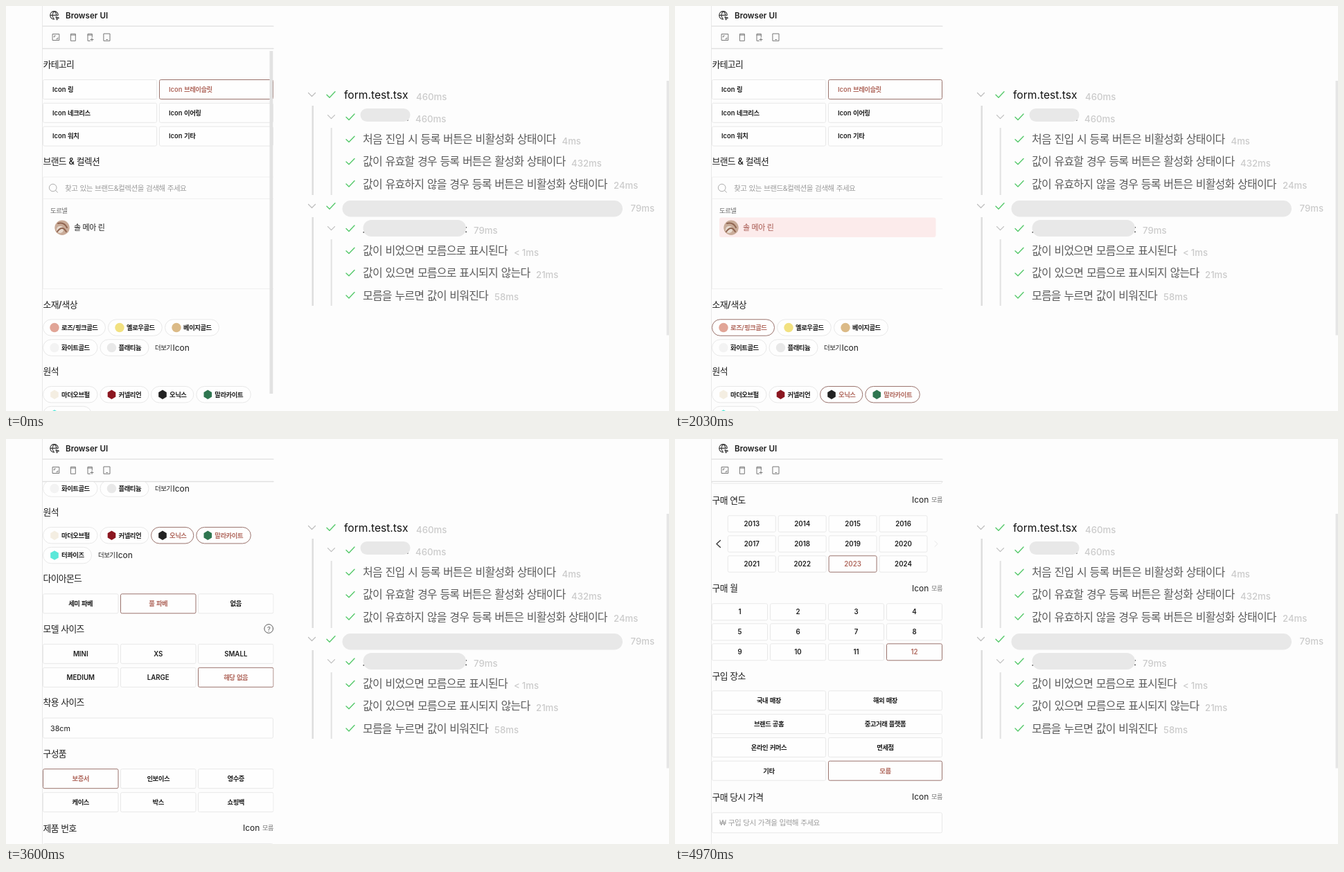
An HTML page for the animation above (5010 ms loop, 957 by 585 pixels).

```html
<!DOCTYPE html>
<html lang="ko">
<head>
<meta charset="utf-8">
<title>Form test run</title>
<style>
  html, body { margin: 0; width: 100%; height: 100%; overflow: hidden; background: #fdfdfd; }
  svg { display: block; }
  text {
    font-family: Inter, 'Noto Sans CJK KR', 'Noto Sans CJK', sans-serif;
    letter-spacing: -.05em; word-spacing: .06em; white-space: pre;
  }
  tspan { letter-spacing: 0; }
  .box rect { fill: #fefefe; stroke: #e8e8e8; }
  .box.on > rect { stroke: #9a736d; }
  .box.on > text { fill: #b0685d; }
  .line { fill: none; stroke-linecap: round; stroke-linejoin: round; }
</style>
</head>
<body>
<svg id="stage" width="957" height="585"></svg>
<script>
const LOOP = 5010;
const DARK = '#1d1d1d', GRAY = '#9c9c9c';

// ---- drawing helpers; y is always the vertical centre of the text or box ----
const text = (x, y, size, str, { weight = 400, fill = DARK, anchor = 'start', extra = '' } = {}) =>
  `<text x="${x}" y="${y + size * .36}" font-size="${size}" font-weight="${weight}" fill="${fill}"
    text-anchor="${anchor}" ${extra}>${str.replace(/[A-Za-z\d.\/]+/g, '<tspan>$&</tspan>')}</text>`;
const rect = (x, y, w, h, fill, extra = '') =>
  `<rect x="${x}" y="${y}" width="${w}" height="${h}" fill="${fill}" ${extra}/>`;
const path = (d, stroke, width = 1) =>
  `<path class="line" d="${d}" stroke="${stroke}" stroke-width="${width}"/>`;
const circle = (x, y, r, fill, extra = '') => `<circle cx="${x}" cy="${y}" r="${r}" fill="${fill}" ${extra}/>`;

const group = (at, body) => `<g class="box" ${at === undefined ? '' : `data-at="${at}"`}>${body}</g>`;
const outline = (x, y, w, h, r) => rect(x, y - h / 2, w, h, 'none', `rx="${r}"`);
const title = (y, str) => text(53.5, y, 12.8, str, { weight: 500 });
const input = (y, body) => group(undefined, outline(53.5, y, 332, 29, 2)) + body;
const hint = (x, y, str) => text(x, y, 10.6, str, { fill: GRAY });
const iconLabel = (x, y, str) => text(x, y, 12, 'Icon') + str;
const unknown = y => iconLabel(342, y, text(370, y, 9.2, '모름', { fill: '#777' }));
const more = (x, y) => text(x, y, 9.4, '더보기', { weight: 500 }) + iconLabel(x + 25.5, y, '');

// Labels fill a grid row by row; "selected" maps a label to its selection time.
function grid(labels, { x = 53.5, y, cols, w, h = 28, stepX, stepY, left, selected = {} }) {
  return labels.map((label, i) => {
    const bx = x + (i % cols) * stepX, by = y + Math.floor(i / cols) * stepY;
    const size = /^[A-Z\d]+$/.test(label) ? 9.7 : 9.4;
    const caption = left
      ? text(bx + 13.5, by, size, label, { weight: 600 })
      : text(bx + w / 2, by, size, label, { weight: 600, anchor: 'middle' });
    return group(selected[label], outline(bx, by, w, h, 2) + caption);
  }).join('');
}

function hexagon(x, y, r, fill) {
  const points = Array.from({ length: 6 }, (_, i) => {
    const a = i * Math.PI / 3;
    return [x + r * Math.sin(a), y + r * Math.cos(a)].map(v => v.toFixed(1));
  });
  return `<polygon points="${points.join(' ')}" fill="${fill}"/>`;
}
const pill = (mark, x, y, w, label, fill, at) => group(at,
  outline(x, y, w, 23.5, 11.75) + mark(x + 16.5, y, 6.7, fill) + text(x + 26.5, y, 9.4, label, { weight: 600 }));

// ---- scrolling form ----
const two = { cols: 2, w: 164, stepX: 168, stepY: 33.8 };
const three = { cols: 3, w: 108.5, stepX: 112, stepY: 34 };
const form = [
  title(84.5, '카테고리'),
  grid(['Icon 링', 'Icon 브레이슬릿', 'Icon 네크리스', 'Icon 이어링', 'Icon 워치', 'Icon 기타'],
    { ...two, y: 120.5, left: true, selected: { 'Icon 브레이슬릿': 0 } }),

  title(224.5, '브랜드 & 컬렉션'),
  path('M53.5 408.5V247H386M53.5 278.5H386M53.5 408.5H386', '#f0f0f0'),
  circle(67.7, 262.5, 5.3, 'none', 'stroke="#aaa"') + path('M71.6 266.4L74.5 269.2', '#aaa'),
  hint(85, 263, '찾고 있는 브랜드&컬렉션을 검색해 주세요'),
  text(64, 295.5, 9.4, '도르넬', { fill: '#666' }),
  rect(64, 305.5, 312.5, 28.5, '#fcebeb', 'rx="3" id="hover"'),
  circle(81, 320.3, 10.7, '#c9ab98'),
  circle(78, 323, 5, '#e9dcd1') + path('M75 314Q84 312 88 320M74 326Q81 316 87 326', '#8f6450', 2),
  text(98, 319.7, 11, '솔 메아 린', { weight: 500, extra: 'id="item"' }),

  title(431, '소재/색상'),
  pill(circle, 53.5, 464.5, 90, '로즈/핑크골드', '#e1a597', 900),
  pill(circle, 147.5, 464.5, 77.8, '옐로우골드', '#f2e180'),
  pill(circle, 229.5, 464.5, 78, '베이지골드', '#dbba87'),
  pill(circle, 53.5, 493.5, 78.5, '화이트골드', '#f3f3f3'),
  pill(circle, 136, 493.5, 70, '플래티늄', '#e8e8e8'),
  more(215, 493.7),

  title(527.5, '원석'),
  pill(hexagon, 53.5, 561.2, 78.5, '마더오브펄', '#f4eee2'),
  pill(hexagon, 136, 561.2, 70, '커넬리언', '#8b1620'),
  pill(hexagon, 209.5, 561.2, 61.3, '오닉스', '#222', 1470),
  pill(hexagon, 274.8, 561.2, 78.5, '말라카이트', '#2f7650', 2030),
  pill(hexagon, 53.5, 590, 70, '터콰이즈', '#5be8d9'),
  more(133, 590),

  title(623.5, '다이아몬드'),
  grid(['세미 파베', '풀 파베', '없음'], { ...three, y: 659.8, selected: { '풀 파베': 3030 } }),

  title(696, '모델 사이즈'),
  circle(379.2, 696, 6.3, 'none', 'stroke="#555"'),
  text(379.2, 696.2, 9.5, '?', { fill: '#555', anchor: 'middle' }),
  grid(['MINI', 'XS', 'SMALL', 'MEDIUM', 'LARGE', '해당 없음'],
    { ...three, y: 732.3, selected: { '해당 없음': 3200 } }),

  title(802.5, '착용 사이즈'),
  input(839.5, text(64, 839.7, 10.8, '', { extra: 'id="size"' })),

  title(876.5, '구성품'),
  grid(['보증서', '인보이스', '영수증', '케이스', '박스', '쇼핑백'],
    { ...three, y: 912.7, selected: { 보증서: 3460, 영수증: 3700 } }),

  title(984, '제품 번호'), unknown(984),
  input(1021.2, hint(64, 1021.5, '인보이스의 Reference/Item 넘버를 입력해 주세요')),

  title(1059.5, '구매 연도'), unknown(1059.5),
  path('M65.5 1118L60 1123L65.5 1128', '#333', 1.3), path('M375 1119L379 1123L375 1127', '#e6e6e6'),
  grid(Array.from({ length: 12 }, (_, i) => `${2013 + i}`),
    { x: 76.3, y: 1094, cols: 4, w: 69, h: 23.5, stepX: 72.9, stepY: 29, selected: { 2023: 4900 } }),

  title(1187, '구매 월'), unknown(1187),
  grid(Array.from({ length: 12 }, (_, i) => `${i + 1}`),
    { y: 1221.3, cols: 4, w: 80, h: 24, stepX: 84, stepY: 29, selected: { 12: 4900 } }),

  title(1313.5, '구입 장소'),
  grid(['국내 매장', '해외 매장', '브랜드 공홈', '중고거래 플랫폼', '온라인 커머스', '면세점', '기타', '모름'],
    { ...two, y: 1349.3, selected: { 모름: 4900 } }),

  title(1488.5, '구매 당시 가격'), unknown(1488.5),
  input(1525.8, hint(64, 1526, '₩ 구입 당시 가격을 입력해 주세요')),
].join('');

// ---- browser header ----
const header = [
  path('M52.5 0V585', '#e8e8e8'),
  path('M53 29.2H386M53 61.5H386', '#e0e0e0', 1.3),
  path('M75.3 12.8A5.8 5.8 0 1 0 69.5 19.2M63.8 13.4H75M69.5 7.6Q64.5 13.4 69.5 19.2M69.5 7.6Q73 10 72.5 13.4M72 15.5L76.5 17.3L74.3 18L73.6 20Z', '#333', 1.1),
  text(86, 13.5, 11.6, 'Browser UI', { weight: 600 }),
  path('M67.5 40.5H76.8V49.5H67.5ZM69.5 45V43H71.5M74.8 45.8V47.6H72.8', '#777'),
  path('M93.8 40.3H100.3V50.3H93.8ZM93.8 42H100.3', '#777'),
  path('M121.5 50.3H118V40.3H124.3V45M118 42H124.3M124 46.5V50.5M122 48.5H126', '#777'),
  path('M141.3 40H150V50.3H141.3ZM144.8 48.5H146.5', '#777'),
].join('');

// ---- test report ----
const check = (x, y) => path(`M${x - 6} ${y + .3}L${x - 2} ${y + 4.2}L${x + 6} ${y - 4.2}`, '#56c96b', 1.4);
const chevron = (x, y) => path(`M${x - 5} ${y - 2.5}L${x} ${y + 2.5}L${x + 5} ${y - 2.5}`, '#bdbdbd', 1.2);
const duration = (x, y, str) => text(x, y, 13.2, str, { weight: 500, fill: '#cbcbcb' });
const mask = (x, y, w, h) => rect(x, y, w, h, '#e8e8e8', `rx="${h / 2}"`);
const rowY = i => 128 + i * 32.2;
const rows = [
  [0, '', 592, '460ms'],
  [1, '', 591, '460ms'],
  [2, '처음 진입 시 등록 버튼은 비활성화 상태이다', 802.5, '4ms'],
  [2, '값이 유효할 경우 등록 버튼은 활성화 상태이다', 816, '432ms'],
  [2, '값이 유효하지 않을 경우 등록 버튼은 비활성화 상태이다', 877, '24ms'],
  [0, '', 901.5, '79ms'],
  [1, '', 675, '79ms'],
  [2, '값이 비었으면 모름으로 표시된다', 733, '< 1ms'],
  [2, '값이 있으면 모름으로 표시되지 않는다', 765, '21ms'],
  [2, '모름을 누르면 값이 비워진다', 705, '58ms'],
];
const report = rows.map(([depth, label, timeX, time], i) => {
  const y = rowY(i);
  return check(depth ? 497 : 469, y)
    + (depth < 2 ? chevron(depth ? 469.5 : 441.5, y) : '')
    + text(515, y, 16, label, { weight: 300, fill: '#5c5c5c' })
    + duration(timeX, y + 2.8, time);
}).join('')
  + text(488, 128, 15.6, 'form.test.tsx', { fill: '#111' })
  + [[144, 273], [305, 433]].map(([top, end]) =>
      rect(441.5, top, 2.5, end - top, '#dedede') + rect(468.7, top + 32, 2, end - top - 32, '#e2e2e2')).join('')
  + rect(579, 164, 1.6, 1.6, '#444') + rect(515.5, 326, 1.6, 1.6, '#444')
  + rect(663.3, 319, 1.6, 1.6, '#444') + rect(663.3, 325.5, 1.6, 1.6, '#444')
  + mask(511.5, 148, 72, 19) + mask(485.5, 281, 404.5, 23.5) + mask(515.5, 309, 148.5, 24)
  + rect(953.5, 108, 3.5, 367.5, '#e6e6e6');

const stage = document.getElementById('stage');
stage.innerHTML = `${header}
  <svg x="53" y="62" width="333.5" height="523" viewBox="53 62 333.5 523">
    <g id="form">${form}</g>
    ${rect(380.5, 247, 5.5, 32, '#ececec', 'id="searchThumb"')}
    ${rect(380.5, 65, 4.8, 495, '#e2e2e2', 'id="thumb"')}
  </svg>${report}`;

// ---- motion ----
const $ = id => document.getElementById(id);
const [formEl, thumb, searchThumb, hover, item, size] =
  ['form', 'thumb', 'searchThumb', 'hover', 'item', 'size'].map($);
const choices = [...document.querySelectorAll('[data-at]')];

const progress = (t, from, to) => Math.min(1, Math.max(0, (t - from) / (to - from)));
const easeOut = p => 1 - (1 - p) ** 2;
const mix = (a, b, p) => a + (b - a) * p;

function scrollAt(t) {
  if (t < 2530) return 0;
  if (t < 2600) return 6;
  if (t < 2630) return 150;
  if (t < 4060) return mix(300, 422, easeOut(progress(t, 3030, 3500)));
  if (t < 4900) return mix(422, 531.5, easeOut(progress(t, 4060, 4400)));
  return t < 4970 ? 560 : 971.5;
}

function thumbOpacity(t) {
  if (t < 2530) return 1 - progress(t, 30, 450);
  if (t < 4060) return 1 - progress(t, 3500, 3570);
  return t < 4970 ? progress(t, 4060, 4100) : 0;
}

function draw(t) {
  const scroll = scrollAt(t), hovered = progress(t, 30, 200);
  formEl.setAttribute('transform', `translate(0 ${-scroll})`);
  thumb.setAttribute('y', 65 + .19 * scroll);
  thumb.setAttribute('opacity', thumbOpacity(t));
  searchThumb.setAttribute('opacity', t >= 30 && t < 900 ? 1 : 0);
  hover.setAttribute('opacity', hovered);
  item.setAttribute('fill', `rgb(${mix(29, 165, hovered)},${mix(29, 85, hovered)},${mix(29, 76, hovered)})`);
  size.innerHTML = `<tspan>${t < 3460 ? '' : t < 3570 ? '3cm' : '38cm'}</tspan>`;
  for (const el of choices) el.classList.toggle('on', t >= +el.dataset.at);
}

const start = performance.now();
function tick() {
  draw((performance.now() - start) % LOOP);
  requestAnimationFrame(tick);
}
tick();
</script>
</body>
</html>
```
